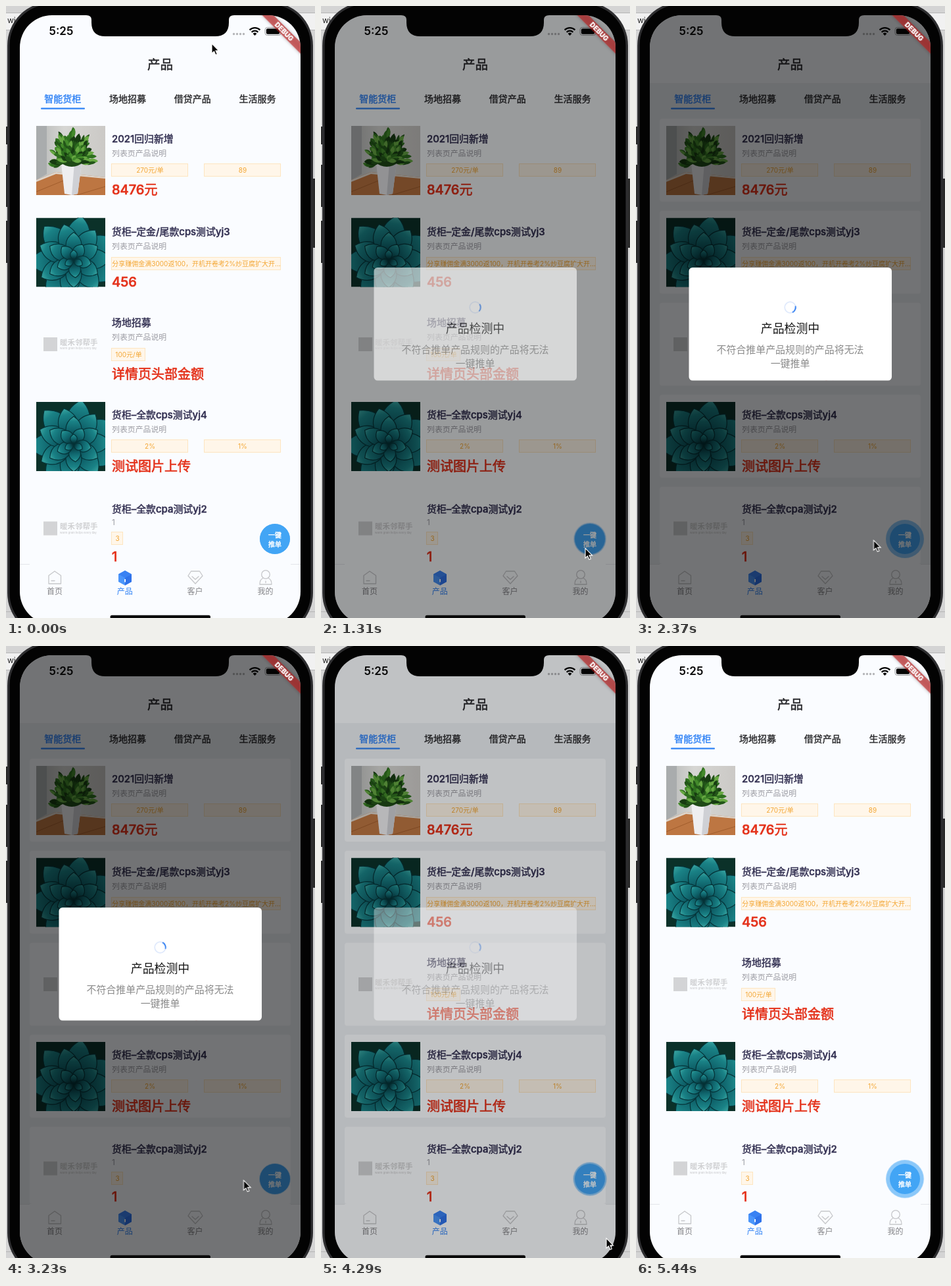
Write an HTML page that moves like this. It is 470 px wide and 929 px high and loops after 5.54 s.

```html
<!DOCTYPE html>
<html lang="zh-CN">
<head>
<meta charset="utf-8">
<title>产品</title>
<style>
html, body { margin: 0; width: 100%; height: 100%; overflow: hidden; background: #d4d4d4; }
svg { display: block; }
text { font-family: Inter, "Noto Sans CJK SC", "Noto Sans CJK", sans-serif; }
.mid { text-anchor: middle; }
/* a hairline stroke gives the CJK glyphs a medium weight */
.semi { font-weight: 500; stroke: currentColor; stroke-width: .45px; fill: currentColor; }
.title { font-size: 19.6px; color: #26262a; }
.tab { font-size: 14px; color: #303033; }
.name { font-size: 14.9px; color: #312e50; }
.note { font-size: 11.9px; fill: #9c9ca3; }
.chip { font-size: 10px; fill: #f3a633; }
.price { font-size: 20px; color: #e4321b; stroke-width: .65px; }
.nav { font-size: 12px; fill: #858589; }
.fab { font-size: 10px; color: #fff; }
.on { color: #3183f5; fill: #3183f5; }
.icon { fill: none; stroke: #c6c7ca; stroke-width: 1.3; stroke-linejoin: round; stroke-linecap: round; }

/* every animation shares one loop so that they stay in step */
.anim { animation: 5540ms linear infinite; }
#halo { animation-name: pulse; animation-timing-function: cubic-bezier(.37, 0, .63, 1); }
#barrier { animation-name: dim; }
#dialog { animation-name: show; }
#gaps { animation-name: gaps; animation-timing-function: step-end; }
#spin { animation-name: spin; }
#cursor { animation-name: move; animation-timing-function: ease-in-out; }

@keyframes pulse {
  0%, .54%, 28.16%, 55.78%, 83.39% { transform: scale(.793); }
  14.35%, 41.97%, 69.58%, 97.2% { transform: scale(1); }
  100% { transform: scale(.98); }
}
@keyframes dim {
  0%, 78.16%, 100% { opacity: 0; }
  22.51% { opacity: 0; animation-timing-function: ease; }
  25.22% { opacity: .54; }
  75.45% { opacity: .54; animation-timing-function: cubic-bezier(.75, 0, .75, .9); }
}
@keyframes show {
  0%, 78.16%, 100% { opacity: 0; }
  22.51% { opacity: 0; animation-timing-function: ease-out; }
  25.22% { opacity: 1; }
  75.45% { opacity: 1; animation-timing-function: ease-in; }
}
@keyframes gaps {
  0%, 78.16%, 100% { opacity: 0; }
  24.55% { opacity: 1; }
}
@keyframes spin {
  from { transform: rotate(-107.8deg); }
  to { transform: rotate(1886.6deg); }
}
@keyframes move {
  0%, 1.08% { transform: translate(313px, 57px); }
  2.71% { transform: translate(299px, 1px); }
  11.01% { transform: translate(395px, 748px); }
  15.34% { transform: translate(405px, 866px); }
  20.76%, 32.31% { transform: translate(402px, 823px); }
  40.61%, 64.8% { transform: translate(361.5px, 811px); }
  73.29%, 86.1% { transform: translate(434px, 899px); }
  89.53%, 100% { transform: translate(434px, 932px); }
}
</style>
</head>
<body>
<svg width="470" height="929" viewBox="0 0 470 929">
  <defs>
    <clipPath id="screen"><rect x="21" y="14" width="427" height="924" rx="49"/></clipPath>
    <clipPath id="list"><rect x="21" y="160" width="427" height="687"/></clipPath>
    <clipPath id="photo"><rect width="105" height="105"/></clipPath>
    <linearGradient id="petal" x2="0" y2="1">
      <stop offset="0" stop-color="#3ba6a2"/>
      <stop offset=".18" stop-color="#1a8286"/>
      <stop offset=".5" stop-color="#0f626a"/>
      <stop offset="1" stop-color="#032529"/>
    </linearGradient>
    <linearGradient id="wall">
      <stop offset="0" stop-color="#b4b6b5"/>
      <stop offset=".4" stop-color="#d6d6d3"/>
      <stop offset="1" stop-color="#cbc9c6"/>
    </linearGradient>
    <filter id="soft" x="-20%" y="-60%" width="140%" height="220%">
      <feDropShadow dx="0" dy="0" stdDeviation="2.5" flood-opacity=".4"/>
    </filter>
    <g id="plant" clip-path="url(#photo)"></g>
    <g id="succulent" clip-path="url(#photo)"></g>
    <g id="blank">
      <rect x="11" y="42" width="21" height="21" fill="#d3d4d6"/>
      <text x="36" y="53.5" font-size="11.5" font-weight="700" fill="#d0d1d3">暖禾邻帮手</text>
      <text x="36" y="60" font-size="4.2" font-weight="600" fill="#d0d1d3">warm grain helps every day</text>
    </g>
  </defs>

  <!-- desktop behind the phone -->
  <rect width="470" height="929" fill="#d4d4d4"/>
  <path d="M0 10H470V36H0Z" fill="#f1f1f1"/>
  <path d="M0 10.5H470M0 36.5H470M0 919.5H470" stroke="#b5b5b5"/>
  <text x="2" y="26" font-size="12" fill="#222">wi</text>
  <path d="M0 183h3v27h-3zM0 241h3v64h-3zM0 326h3v64h-3zM466 262h4v105h-4z" fill="#2a2a2a"/>

  <!-- phone body -->
  <rect x="2" y="-6" width="465" height="963" rx="66" fill="#2e2e30"/>
  <rect x="5.5" y="-2.5" width="458" height="956" rx="62" fill="#030303"/>

  <g clip-path="url(#screen)">
    <rect x="21" y="14" width="427" height="924" fill="#fafcff"/>
    <g id="gaps" class="anim">
      <rect x="21" y="117" width="427" height="730" fill="#edf0f4"/>
    </g>

    <text class="title semi mid" x="234.5" y="96">产品</text>
    <g id="tabs"></g>
    <rect x="53" y="154.6" width="67" height="2.2" rx="1" fill="#3183f5"/>
    <g id="rows" clip-path="url(#list)"></g>

    <path d="M21 847.5H36M433 847.5H448" stroke="#e4e6ea"/>
    <g class="icon">
      <path d="M65 864.5L74 858L83.5 864.5V877H65ZM69 872.5H74"/>
      <path d="M281.5 858H294.5L299 865L288 877L277 865ZM283 866L288 870.5L293 866"/>
      <circle cx="395" cy="863" r="6.3"/>
      <path d="M391 868.5C387 870 386 873 386 878H404C404 873 403 870 399 868.5M395 873V875.5"/>
    </g>
    <path d="M181 857L191 862.5V874L181 879.5L171 874V862.5Z" fill="#4a95fa"/>
    <path d="M181 857L191 862.5L181 868L171 862.5Z" fill="#3a82f3"/>
    <path d="M181 868L191 862.5V874L181 879.5Z" fill="#2f72ea"/>
    <rect x="180.2" y="870" width="1.8" height="4.5" fill="#fff"/>
    <g id="nav"></g>

    <g transform="translate(409 809)">
      <circle id="halo" class="anim" r="29" fill="#42a5f5" fill-opacity=".6"/>
      <circle r="23" fill="#42a5f5"/>
      <text class="fab semi mid" y="-2.5">一键</text>
      <text class="fab semi mid" y="11.5">推单</text>
    </g>

    <!-- status bar -->
    <text x="65.5" y="44" font-size="17" font-weight="600" fill="#050505">5:25</text>
    <path d="M346.5 42.5h.01M351.5 42.5h.01M356.5 42.5h.01M361.5 42.5h.01" stroke="#b4b5b8" stroke-width="3.4" stroke-linecap="round"/>
    <path d="M370.6 36.4A11 11 0 0 1 386.4 36.4M373.6 39.7A7 7 0 0 1 383.4 39.7" fill="none" stroke="#050505" stroke-width="2.3"/>
    <path d="M378.5 45L375.6 42A4.2 4.2 0 0 1 381.4 42Z" fill="#050505"/>
    <rect x="394" y="32.5" width="24" height="12" rx="3.6" fill="none" stroke="#9b9c9f"/>
    <rect x="395.8" y="34.3" width="20.4" height="8.4" rx="2.2" fill="#050505"/>

    <rect id="barrier" class="anim" x="21" y="14" width="427" height="924"/>

    <g id="dialog" class="anim">
      <rect x="80.5" y="397" width="308.5" height="171.5" rx="5.5" fill="#fff"/>
      <g transform="translate(234.5 457.5)" fill="none">
        <circle r="8.3" stroke="#dfe9fc" stroke-width="1.7"/>
        <g id="spin" class="anim">
          <path d="M6.36 -5.34A8.3 8.3 0 0 1 6.36 5.34" stroke="#3480f2" stroke-width="1.9"/>
        </g>
      </g>
      <text class="mid" x="234.5" y="495.5" font-size="17.9" fill="#151515">产品检测中</text>
      <g class="mid" font-size="14.95" fill="#8a8a8a">
        <text x="234.5" y="526.5">不符合推单产品规则的产品将无法</text>
        <text x="234.5" y="547.5">一键推单</text>
      </g>
    </g>

    <g transform="translate(448 14) rotate(45)">
      <rect x="-48" y="29" width="96" height="12.3" fill="#b71c1c" fill-opacity=".63" filter="url(#soft)"/>
      <text class="mid" y="38.8" font-size="10.2" font-weight="900" fill="#fff">DEBUG</text>
    </g>
  </g>

  <path d="M122 13H347V14Q339 14 339 21V25Q339 46 318 46H151Q130 46 130 25V21Q130 14 122 14Z" fill="#030303"/>
  <rect x="158.5" y="924.8" width="152.5" height="5.5" rx="2.7" fill="#0a0a0a"/>

  <path id="cursor" class="anim" d="M0 0V15L3.5 11.8L5.9 17.3L8.3 16.3L6 10.9H10.6Z" fill="#050505" stroke="#fff" stroke-width="1.1"/>
</svg>

<script>
const $ = id => document.getElementById(id);
const text = (cls, x, y, s) => `<text class="${cls}" x="${x}" y="${y}">${s}</text>`;
const photo = (id, y) => `<use href="#${id}" x="46" y="${y}"/>`;
const chip = (y, [x, w, s]) =>
  `<rect x="${x - .5}" y="${y + .5}" width="${w}" height="19" fill="#fff6e9" stroke="#fde5c0"/>` +
  text('chip mid', x + w / 2, y + 13.7, s);

// top of the photo, baselines of name, note and price, top of the chips
const rows = [
  { pic: 'plant', y: 182, name: [206.5, '2021回归新增'], note: [227.5, '列表页产品说明'],
    chipY: 239, chips: [[161, 116, '270元/单'], [302, 116, '89']], price: [286, '8476元'] },
  { pic: 'succulent', y: 321.5, name: [348, '货柜–定金/尾款cps测试yj3'], note: [369, '列表页产品说明'],
    chipY: 381, chips: [[161, 257, '分享赚佣金满3000返100，开机开卷考2%炒豆腐扩大开...']], price: [426, '456'] },
  { pic: 'blank', y: 461, name: [486, '场地招募'], note: [506.5, '列表页产品说明'],
    chipY: 519, chips: [[161, 51, '100元/单']], price: [566, '详情页头部金额'] },
  { pic: 'succulent', y: 601, name: [626, '货柜–全款cps测试yj4'], note: [646.5, '列表页产品说明'],
    chipY: 658, chips: [[161, 116, '2%'], [302, 116, '1%']], price: [706, '测试图片上传'] },
  { pic: 'blank', y: 740.5, name: [768.5, '货柜–全款cpa测试yj2'], note: [787.5, '1'],
    chipY: 798, chips: [[161, 17, '3']], price: [843, '1'] },
];

$('rows').innerHTML = rows.map(r =>
  photo(r.pic, r.y) +
  text('name semi', 161, r.name[0], r.name[1]) +
  text('note', 161, r.note[0], r.note[1]) +
  r.chips.map(c => chip(r.chipY, c)).join('') +
  text('price semi', 161, r.price[0], r.price[1])).join('');

$('gaps').innerHTML += rows.map((r, i) =>
  `<rect x="36" y="${171 + i * 139.7}" width="397" height="${i < 4 ? 126 : 117.2}" rx="4" fill="#fafcff"/>`).join('');

$('tabs').innerHTML = ['智能货柜', '场地招募', '借贷产品', '生活服务'].map((s, i) =>
  text(i ? 'tab semi mid' : 'tab semi mid on', 86.2 + i * 98.8, 146, s)).join('');

$('nav').innerHTML = ['首页', '产品', '客户', '我的'].map((s, i) =>
  text(i === 1 ? 'nav mid on' : 'nav mid', 74 + i * 106.8, 893, s)).join('');

// pointed leaf growing upwards from its base
const leaf = (x, y, angle, len, w, paint) =>
  `<path transform="translate(${x} ${y}) rotate(${angle})" ${paint}
    d="M0 0C${-w} ${-len * .35} ${-w} ${-len * .75} 0 ${-len}C${w} ${-len * .75} ${w} ${-len * .35} 0 0"/>`;

let seed = 7;
const rnd = () => (seed = (seed * 16807) % 2147483647) / 2147483647;

// leaves fan out from the mouth of the vase, the outer ones first
const greens = ['#173c12', '#235619', '#2f701f', '#438a2b', '#67a843'];
let crown = '';
for (let i = 0; i < 130; i++) {
  const a = -105 + rnd() * 210, t = a * Math.PI / 180, d = 36 * (1 - i / 130);
  crown += leaf(54 + Math.sin(t) * d * .75, 53 - Math.cos(t) * d, a * .8 + (rnd() - .5) * 60,
    9 + rnd() * 9, 2.5 + rnd() * 2, `fill="${greens[Math.floor(rnd() * 5)]}"`);
}
$('plant').innerHTML = `
  <rect width="105" height="105" fill="url(#wall)"/>
  <path d="M0 0H16V73L0 82Z" fill="#a9acad"/>
  <path d="M0 82L30 70L105 78V105H0Z" fill="#bd7642"/>
  <path d="M0 82L30 70L105 78V80L30 73L0 85Z" fill="#ddd5cc"/>
  <path d="M0 100L44 82M62 105L105 92" stroke="#a15d2d" fill="none"/>
  <path d="M38 57H69L63 103L54 105L43 103Z" fill="#eeeef1"/>
  <path d="M58 57H69L63 103L54 105Z" fill="#cfd0d5"/>
  <ellipse cx="54" cy="40" rx="24" ry="22" fill="#1f4a17"/>` + crown;

// petals per ring, length, half width, turn
const rings = [[7, 68, 24, 10], [7, 56, 20, 36], [6, 42, 16, 0], [5, 27, 12, 30], [3, 15, 7, 0]];
$('succulent').innerHTML = '<rect width="105" height="105" fill="#0b3129"/>' +
  rings.map(([n, len, w, turn]) => Array.from({ length: n }, (_, i) =>
    leaf(57, 64, turn + i * 360 / n, len, w,
      'fill="url(#petal)" stroke="#053338" stroke-width="1.2"')).join('')).join('');
</script>
</body>
</html>
```
